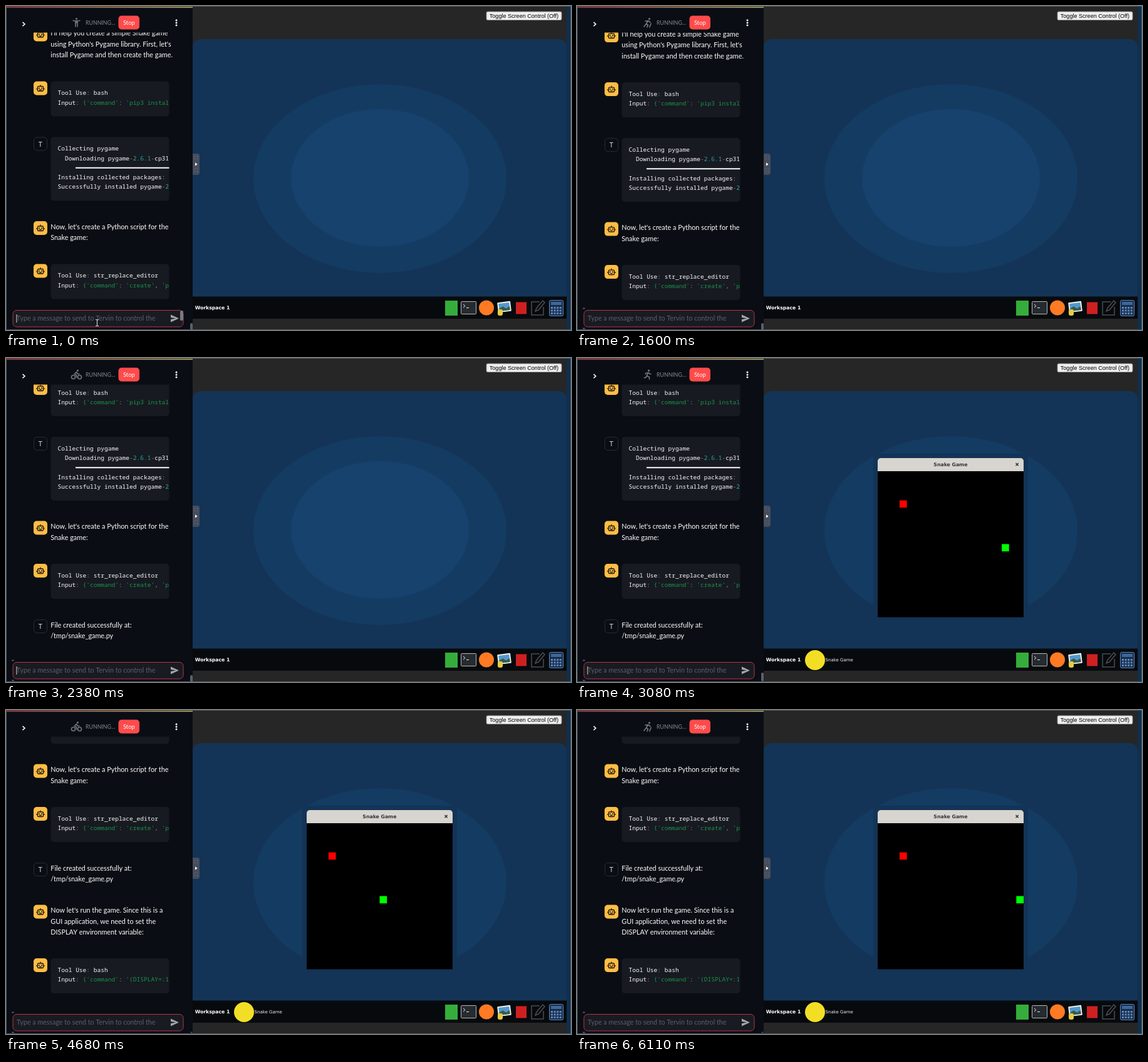
These frames come from a looping animation (902x518 px, 6.13 s). An HTML page with a canvas:

```html
<!DOCTYPE html>
<html lang="en">
<head>
<meta charset="utf-8">
<title>Agent building a snake game</title>
<style>
html, body { margin: 0; width: 100%; height: 100%; overflow: hidden; background: #0a0d13; }
canvas { display: block; }
</style>
</head>
<body>
<canvas id="stage" width="902" height="518"></canvas>
<script>
const LOOP = 6130;
const WINDOW_OPENS = 2720;
const ctx = document.getElementById('stage').getContext('2d');

const SANS = 'Lato, sans-serif';
const MONO = '"Noto Sans Mono", monospace';
const DEJAVU = '"DejaVu Sans", sans-serif';
const WHITE = '#fafafa', GREEN = '#1b934a', TEAL = '#2aa9a0', RED = '#d5573f', DIM = '#8d9098';

// ---- drawing helpers ----
function rect(x, y, w, h, fill, radius = 0, stroke, width = 1) {
  ctx.beginPath();
  ctx.roundRect(x, y, w, h, radius);
  if (fill) { ctx.fillStyle = fill; ctx.fill(); }
  if (stroke) { ctx.strokeStyle = stroke; ctx.lineWidth = width; ctx.stroke(); }
}

function ellipse(x, y, rx, ry, fill) {
  ctx.beginPath();
  ctx.ellipse(x, y, rx, ry, 0, 0, Math.PI * 2);
  ctx.fillStyle = fill;
  ctx.fill();
}

function line(d, color, width = 1) {
  ctx.strokeStyle = color;
  ctx.lineWidth = width;
  ctx.stroke(new Path2D(d));
}

function shape(d, color) {
  ctx.fillStyle = color;
  ctx.fill(new Path2D(d));
}

// y is the visual middle of the line
function text(str, x, y, size, family, color, weight = 400) {
  ctx.font = `${weight} ${size}px ${family}`;
  ctx.fillStyle = color;
  ctx.fillText(str, x, y + size * 0.34);
  return ctx.measureText(str).width;
}

function at(x, y, draw) {
  ctx.save();
  ctx.translate(x, y);
  draw();
  ctx.restore();
}

// ---- motion ----
const scrollKeys = [
  [0, -28.5], [600, -28.5], [850, 0], [1250, 0], [1660, -28.5],
  [1880, -28.5], [2214, -112], [3400, -112], [3900, -286], [LOOP, -286]
];

function scrollAt(t) {
  const i = scrollKeys.findIndex(k => k[0] > t);
  const [t0, a] = scrollKeys[i - 1], [t1, b] = scrollKeys[i];
  const u = (t - t0) / (t1 - t0);
  return a + (b - a) * u * u * (3 - 2 * u);
}

const snakeColumn = t => Math.floor(17.4 + (t - 3080) / 48.9) % 20;

// ---- chat ----
const toolCall = (name, command) => [
  [['Tool Use', WHITE], [':', DIM], [' ' + name, WHITE]],
  [['Input', WHITE], [': ', DIM], ["{'command'", GREEN], [': ', DIM], ...command]
];

const chat = [
  { y: 63, say: ["I'll help you create a simple Snake game", "using Python's Pygame library. First, let's", 'install Pygame and then create the game.'] },
  { y: 149, h: 56, code: toolCall('bash', [["'pip3 install pygame'", GREEN]]) },
  { y: 238, h: 102, tool: true, code: [
    [['Collecting pygame', WHITE]],
    [['  Downloading pygame', WHITE], ['-', RED], ['2.6.1', TEAL], ['-', RED], ['cp311', WHITE]],
    [],
    [['Installing collected packages', WHITE], [':', DIM]],
    [['Successfully installed pygame', WHITE], ['-', RED], ['2.6.1', TEAL]]
  ] },
  { y: 372.5, say: ["Now, let's create a Python script for the", 'Snake game:'] },
  { y: 441, h: 56, code: toolCall('str_replace_editor', [["'create'", GREEN], [', ', DIM], ["'path'", GREEN]]) },
  { y: 530, tool: true, say: ['File created successfully at:', '/tmp/snake_game.py'] },
  { y: 597.5, say: ["Now let's run the game. Since this is a", 'GUI application, we need to set the', 'DISPLAY environment variable:'] },
  { y: 683, h: 56, code: toolCall('bash', [["'(DISPLAY=:1", GREEN]]) }
];

function avatar(y, tool) {
  if (tool) {
    rect(44.5, y + .5, 21, 21, '#0a0d13', 5, '#292d37');
    text('T', 51.8, y + 11.5, 10.5, SANS, '#d5d7dc');
    return;
  }
  rect(44, y, 22, 22, '#ffbd45', 5);
  at(55, y + 11, () => {
    const ink = '#1c170c';
    rect(-4.5, -3, 9, 7.5, null, 1.5, ink, 1.4);
    line('M0-3V-5.5M-6 0V2M6 0V2M-2 2.5H2', ink, 1.3);
    ellipse(-2, 0, 1, 1, ink);
    ellipse(2, 0, 1, 1, ink);
  });
}

function drawMessage(m) {
  avatar(m.y, m.tool);
  if (m.say) {
    m.say.forEach((s, i) => text(s, 71.3, m.y + 9.2 + i * 17.5, 10.85, SANS, '#fff'));
    return;
  }
  ctx.save();
  rect(71.5, m.y, 189, m.h, '#171a21', 5);
  ctx.clip();
  m.code.forEach((parts, i) => {
    let x = 82.5;
    const y = m.y + 18.7 + i * 15.25;
    if (!parts.length) rect(111, y - 1, 160, 2, WHITE);
    for (const [s, color] of parts) x += text(s, x, y, 9.55, MONO, color);
  });
  ctx.restore();
}

// ---- status figures: head position, limbs ----
const stand = [0, -6, 'M-6-3.2Q0-2 6-3.2M0-3V1M-1.5-2V7M1.5-2V7'];
const bike = [2, -6.5, 'M-2 4a3 3 0 1 1-6 0a3 3 0 1 1 6 0M8 4a3 3 0 1 1-6 0a3 3 0 1 1 6 0M5-1H2L0-4L-3-1L0 1V5'];
const skate = [3, -6, 'M1-3L-2 2L1 4L-1 8M1-3L5 0M1-3L-4-2M-2 2L-6 7M3 8L6 1'];
const run = [2, -6.3, 'M1-3L-1 2L3 4V8M-1 2L-3 5H-6M1-3L-3-2V0M1-3L4-1H6'];
const swim = [4.5, -2, 'M-5-5L0-6L3 0M1-4L-4 0M-7 2.5q1.75-2 3.5 0t3.5 0t3.5 0t3.5 0M-7 6q1.75-2 3.5 0t3.5 0t3.5 0t3.5 0'];
// each figure lasts until the given ms of the cycle
const figures = [[110, stand], [320, bike], [650, skate], [890, run], [1060, swim], [1128, stand]];

function drawFigure(t) {
  const phase = t % 1128;
  const [hx, hy, limbs] = figures.find(f => phase < f[0])[1];
  at(112.5, 26.5, () => {
    ellipse(hx, hy, 1.6, 1.6, '#74777d');
    line(limbs, '#74777d', 1.6);
  });
}

function drawPanel(t) {
  rect(0, 0, 298, 518, '#0a0d13');

  ctx.save();
  ctx.beginPath();
  ctx.rect(0, 42.5, 298, 432.5);
  ctx.clip();
  ctx.translate(0, scrollAt(t));
  chat.forEach(drawMessage);
  ctx.restore();

  const bar = ctx.createLinearGradient(0, 0, 298, 0);
  bar.addColorStop(0, '#d8403f');
  bar.addColorStop(1, '#e5d66c');
  rect(1, 1.4, 297, 1.4, bar);
  line('M26.5 25.8L30 29L26.5 32.2', WHITE, 1.6);
  drawFigure(t);
  text('RUNNING...', 127, 26.7, 8.8, SANS, '#85888f');
  rect(179.5, 15.5, 33.5, 22, '#ff4b4b', 5);
  text('Stop', 187, 26.5, 9.3, SANS, '#fff');
  for (const y of [22.7, 26.7, 30.7]) ellipse(272, y, 1.5, 1.5, WHITE);

  // message field
  rect(11, 486.5, 272, 26.5, '#191b22', 6, '#b5363e');
  text('Type a message to send to Tervin to control the', 17, 499.8, 10.7, SANS, '#5c5f67');
  if ((t + 180) % 1060 < 530) rect(16.5, 493, 1, 13, '#d8dadd');
  shape('M263 493.5L276 499.5L263 505.5V501L271 499.5L263 498Z', '#a5a7ad');
  if (t < 300) {
    rect(278, 487, 5, 16, '#777a82', 2);
    line('M143 501.5H145L145.5 502.5L146 501.5H148M145.5 502V511M143 511.5H145L145.5 510.5L146 511.5H148', '#e8e8e8');
  }
  if (t > 1500) for (const y of [483.5, 515.5]) ellipse(11, y, 2, 1, '#586577');
  if (t < 3900) rect(294, t < 2400 ? 507 : 503, 4, 14, '#5d6068', 2);
  else ellipse(296, 515.5, 1.5, 1, '#5d6068');
}

// ---- remote desktop ----
function drawIcons() {
  rect(701, 471, 20, 24, '#35ad3b');

  rect(726.5, 472.5, 24, 20, '#252b2e', 1, '#b7bbb9');
  line('M730 477L733 479.5L730 482M735 482.5H739', '#e8e8e8');

  ellipse(767, 482.5, 12, 12, '#ff7a22');

  at(795, 481, () => {
    ctx.rotate(-.12);
    rect(-10, -8, 21, 16, '#f1f1ec', 1);
    rect(-8, -6, 17, 12, '#5299d1');
    shape('M-8 6V2L-2-1L3 3L9 0V6Z', '#385c43');
  });
  rect(785, 485, 8, 10, '#e7cb47', 3);

  rect(814, 473.5, 17, 19, '#cf2020');

  line('M852 473H839V494H858V481M845 488L847 483L857 471L860 474L850 486Z', '#4b4f51', 1.5);

  rect(867.5, 470.5, 22, 25, '#182c49', 2, '#5c87bd');
  rect(870, 473, 17, 5, '#3f6699');
  for (let i = 0; i < 12; i++) {
    rect(870 + i % 4 * 4.6, 481 + Math.floor(i / 4) * 4.5, 3, 3, '#5c87bd');
  }
}

function drawGame(t) {
  const cell = 233 / 20;
  const block = (col, row, color) => rect(480 + col * cell, 181 + row * cell, cell, cell, color);
  rect(480, 160, 233, 22, '#d8d4d0', [5, 5, 0, 0]);
  text('Snake Game', 569.3, 170.5, 7.75, DEJAVU, '#303638', 700);
  line('M700.5 168L704.7 172.2M704.7 168L700.5 172.2', '#303638', 1.5);
  rect(480, 181, 233, 233.5, '#000');
  block(3, 4, '#f00');
  block(snakeColumn(t), 10, '#0f0');

  ellipse(380, 483, 16, 16, '#f2df25');
  text('Snake Game', 396.5, 482.5, 7, DEJAVU, '#f0f0f0');
}

function drawDesktop(t) {
  const open = t >= WINDOW_OPENS;
  rect(298, 0, 604, 518, '#262626');
  rect(298, 53, 597, 412, '#133456', [12, 12, 0, 0]);
  ellipse(597, 276, 202, 151, '#143b62');
  if (open) rect(473, 153, 247, 280, '#133456');
  else ellipse(597, 275, 142, 110, '#17426e');

  rect(298, 464.5, 597, 35.5, '#070a0d');
  rect(895, 0, 7, 518, '#102e4d');
  text('Workspace 1', 301.8, 482.5, 7.7, DEJAVU, '#fff', 700);
  drawIcons();
  if (open) drawGame(t);

  rect(767, 9, 120, 13.5, '#efefef', 2, '#858585');
  text('Toggle Screen Control (Off)', 771.8, 15.8, 9.07, '"Liberation Sans", Arial, sans-serif', '#000');

  // side handle
  rect(298, 236, 11, 34, '#474d5d', [0, 4, 4, 0]);
  for (let y = 240; y < 268; y += 4) {
    if (Math.abs(y - 252) > 4) for (const x of [301, 305]) rect(x, y, 1, 1, '#747b8c');
  }
  shape('M302 250.3L305.5 253L302 255.7Z', '#fff');
}

function frame(now) {
  const t = now % LOOP;
  drawDesktop(t);
  drawPanel(t);
  rect(.5, .5, 901, 517, null, 0, '#4a5b6b');
  requestAnimationFrame(frame);
}

frame(0);
</script>
</body>
</html>
```
